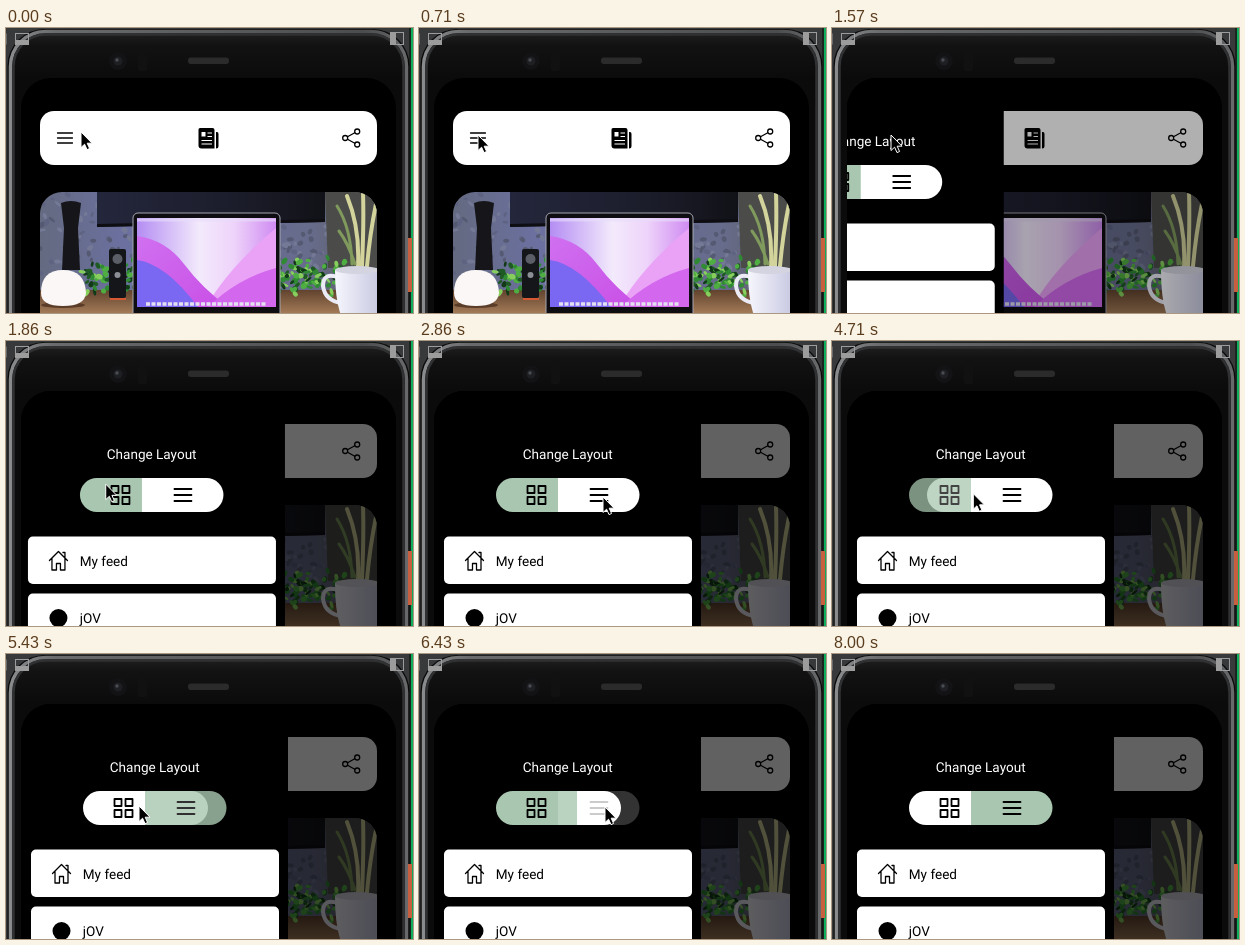
An HTML page that plays this animation: 407x285 px, repeating every 8.57 s.

```html
<!DOCTYPE html>
<html lang="en">
<head>
<meta charset="utf-8">
<title>Layout toggle</title>
<style>
html, body { margin: 0; width: 100%; height: 100%; overflow: hidden; background: #38393a; }
svg { display: block; width: 100%; height: 100%; }
text { font-family: Roboto, sans-serif; font-size: 13.55px; text-rendering: geometricPrecision; }
.line { fill: none; stroke: #000; stroke-width: 1.3; stroke-linecap: round; stroke-linejoin: round; }
.bold { stroke-width: 1.8; }
</style>
</head>
<body>
<svg viewBox="0 0 407 285" preserveAspectRatio="none">
  <defs>
    <linearGradient id="body" x1="0" y1="0" x2="0" y2="50" gradientUnits="userSpaceOnUse">
      <stop offset="0" stop-color="#242425"/><stop offset=".35" stop-color="#121213"/><stop offset="1" stop-color="#0b0b0c"/>
    </linearGradient>
    <linearGradient id="rim" x1="0" y1="0" x2="407" y2="0" gradientUnits="userSpaceOnUse">
      <stop offset="0" stop-color="#8d8e8f"/><stop offset=".12" stop-color="#6a6b6c"/>
      <stop offset=".88" stop-color="#4c4d4e"/><stop offset="1" stop-color="#6c6d6e"/>
    </linearGradient>
    <linearGradient id="wall" x1="0" y1="0" x2="1" y2="0">
      <stop offset="0" stop-color="#646a80"/><stop offset=".25" stop-color="#6b70a0"/>
      <stop offset=".8" stop-color="#676c8c"/><stop offset="1" stop-color="#5c5a58"/>
    </linearGradient>
    <linearGradient id="monitor" x1="0" y1="0" x2="1" y2="0">
      <stop offset="0" stop-color="#24263c"/><stop offset=".6" stop-color="#1c1d2b"/><stop offset="1" stop-color="#111217"/>
    </linearGradient>
    <linearGradient id="desk" x1="0" y1="0" x2="0" y2="1">
      <stop offset="0" stop-color="#61432e"/><stop offset="1" stop-color="#a27a57"/>
    </linearGradient>
    <linearGradient id="display" x1="0" y1="0" x2="1" y2="0">
      <stop offset="0" stop-color="#b48df3"/><stop offset=".45" stop-color="#f3eafc"/>
      <stop offset=".7" stop-color="#eed3fa"/><stop offset="1" stop-color="#cf8bf2"/>
    </linearGradient>
    <linearGradient id="ridge" x1="0" y1="0" x2="1" y2="1">
      <stop offset="0" stop-color="#d070f0"/><stop offset="1" stop-color="#c94fe6"/>
    </linearGradient>
    <linearGradient id="mug" x1="0" y1="0" x2="1" y2="0">
      <stop offset="0" stop-color="#f6f6fd"/><stop offset="1" stop-color="#c9cae2"/>
    </linearGradient>
    <clipPath id="screen"><rect x="15" y="50" width="375" height="290" rx="30"/></clipPath>
    <clipPath id="card"><rect x="34" y="164" width="337" height="160" rx="22"/></clipPath>
    <clipPath id="lid"><rect x="131" y="190" width="139" height="89"/></clipPath>
  </defs>

  <!-- window behind the phone -->
  <rect width="407" height="285" fill="#38393a"/>
  <rect x="403" width="4" height="285" fill="#1c2420"/>
  <rect x="405" width="2" height="285" fill="#0fae5c"/>

  <!-- phone -->
  <rect x="1.500" y="1" width="402" height="340" rx="37" fill="#0a0a0a"/>
  <rect x="4.500" y="3.500" width="396" height="340" rx="35" fill="url(#body)" stroke="url(#rim)" stroke-width="3.500"/>
  <rect x="7.500" y="6.500" width="390" height="340" rx="32" fill="none" stroke="#303132" stroke-width="2.500"/>
  <rect x="402" y="210" width="4" height="54" fill="#c8603f"/>
  <g fill="none" stroke="#9c9c9c">
    <path d="M0 5.500V16.500"/>
    <rect x="9.500" y="5.500" width="13" height="11"/>
    <rect x="384.500" y="4.500" width="13" height="12"/>
  </g>
  <path d="M10 12H22V16H10ZM385 5H390V16H385Z" fill="#9c9c9c"/>
  <circle cx="112" cy="33" r="9" fill="#131315"/>
  <circle cx="112" cy="33" r="4.500" fill="#1e1f23"/>
  <circle cx="111" cy="32" r="1.700" fill="#4a4c53"/>
  <rect x="132" y="24" width="9" height="19" rx="2" fill="#111112"/>
  <rect x="182" y="29.500" width="41" height="6.500" rx="3" fill="#2b2b2c"/>
  <rect x="15" y="50" width="375" height="290" rx="30"/>

  <g clip-path="url(#screen)">
    <!-- header -->
    <rect x="34" y="83" width="337" height="54" rx="14" fill="#fff"/>
    <path class="line" d="M51.500 105H66.500M51.500 110H66.500M51.500 115H66.500"/>
    <path d="M194 100H206.500Q208.500 100 208.500 102V120.500H195.500Q192.500 120.500 192.500 117.500V101.500Q192.500 100 194 100ZM210 104H211Q212.500 104 212.500 106V118Q212.500 120.500 210 120.500Z"/>
    <path d="M201.500 105H206M201.500 108.500H206M195.500 112.500H206M195.500 116H206" stroke="#fff" stroke-width="1.200"/>
    <rect x="195.500" y="104" width="4" height="4.500" fill="#fff"/>
    <g class="line">
      <path d="M341.500 108.800L348.800 104.800M341.500 111.200L348.800 115.200"/>
      <circle cx="339.200" cy="110" r="2.500"/><circle cx="351.200" cy="103.500" r="2.500"/><circle cx="351.200" cy="116.500" r="2.500"/>
    </g>

    <!-- picture card -->
    <g clip-path="url(#card)">
      <rect x="34" y="164" width="337" height="121" fill="url(#wall)"/>
      <g id="texture"></g>
      <path d="M91 164H319V194L91 199Z" fill="url(#monitor)"/>
      <path d="M91 196L319 191V194L91 199Z" fill="#0d0d12"/>
      <rect x="34" y="262" width="337" height="23" fill="url(#desk)"/>
      <path d="M319 164H371V240H322Z" fill="#4b4c49"/>
      <g id="leaves"></g>
      <g fill="none" stroke="#d3d39c" stroke-width="4" stroke-linecap="round">
        <path d="M352 238Q354 200 341 168M356 238Q358 195 357 164M361 238Q364 205 370 176"/>
        <path d="M349 236Q342 215 333 203M346 236Q345 200 331 178" stroke="#7f9a5c" stroke-width="3"/>
      </g>
      <path d="M55 175Q65 171 75 175L72 200L74 242H56L58 200Z" fill="#15151a"/>
      <rect x="103" y="221" width="17" height="49" rx="2" fill="#15161a"/>
      <circle cx="111.500" cy="231" r="5" fill="#5b5e66"/><circle cx="111.500" cy="247" r="3" fill="#8c8f96"/>
      <path d="M104 271H120" stroke="#d55a34" stroke-width="2"/>
      <ellipse cx="57" cy="277" rx="22" ry="3" fill="#5a3c28"/>
      <path d="M35 265Q35 242 57 242T80 265Q79 278 57 278T35 265Z" fill="#fbf7f6"/>
      <rect x="127" y="185" width="147" height="105" rx="5" fill="#0d0d12" stroke="#a5a6b0"/>
      <g clip-path="url(#lid)">
        <rect x="131" y="190" width="139" height="89" fill="url(#display)"/>
        <path d="M200 279Q222 240 270 200V279Z" fill="#e9a2f6"/>
        <path d="M131 208Q160 212 178 236T222 279H131Z" fill="url(#ridge)"/>
        <path d="M131 232Q160 236 192 279H131Z" fill="#7a68f2"/>
        <path d="M202 279Q232 250 270 240V279Z" fill="#d368ee"/>
        <path d="M131 192H270" stroke="#e8defa" stroke-width="3" opacity=".6"/>
        <path d="M140 276H261" stroke="#e3dff1" stroke-width="3.500" stroke-dasharray="4 1.500"/>
      </g>
      <path d="M334 250Q317 243 317 258Q319 273 336 275" fill="none" stroke="#ebebf6" stroke-width="4"/>
      <path d="M329 242H372V290H336Q329 274 329 242Z" fill="url(#mug)"/>
      <ellipse cx="351" cy="242" rx="22" ry="4" fill="#d3d4e0"/>
    </g>
    <rect id="shade" x="15" y="50" width="375" height="235" opacity="0"/>

    <!-- drawer -->
    <g id="drawer">
      <rect x="15" y="50" width="267" height="235"/>
      <text x="148.700" y="118" text-anchor="middle" fill="#fff">Change Layout</text>
      <rect x="95" y="137" width="107" height="34" rx="17" fill="#fff"/>
      <g id="gridTab">
        <path d="M158 137H94A17 17 0 0 0 94 171H158Z"/>
        <path class="line bold" d="M108.500 145H115.500V152H108.500ZM119.500 145H126.500V152H119.500ZM108.500 156H115.500V163H108.500ZM119.500 156H126.500V163H119.500Z"/>
      </g>
      <g id="listTab">
        <path d="M139 137H203.500A17 17 0 0 1 203.500 171H139Z"/>
        <path class="line bold" d="M171.500 148H188.500M171.500 154H188.500M171.500 160H188.500"/>
      </g>
      <rect x="25" y="195.500" width="248" height="47.500" rx="5" fill="#fff"/>
      <rect x="25" y="252.500" width="248" height="47.500" rx="5" fill="#fff"/>
      <path class="line" d="M46.500 219.500L55.500 210.500L64.500 219.500M49 217.500V229H53.500V222.500H57.500V229H62V217.500M62 216.500V211.500H60"/>
      <circle cx="55.500" cy="277" r="9"/>
      <text x="76.800" y="225">My feed</text>
      <text x="76.800" y="282">jOV</text>
    </g>
  </g>

  <path id="cursor" d="M0 0V15.500L3.600 12.200L6 17.600L8.600 16.500L6.200 11.200H11Z" stroke="#fff" stroke-width="1"/>
</svg>
<script>
const LOOP = 8570, STEP = 1000 / 7, GREEN = '#a9c7b0';
const $ = id => document.getElementById(id);
const clamp = u => Math.max(0, Math.min(1, u));
const mix = (a, b, u) => a + (b - a) * u;
const easeOut = u => 1 - (1 - u) ** 3;
const easeInOut = u => u < .5 ? 2 * u * u : 1 - 2 * (1 - u) ** 2;

// tab, press time, release time
const taps = [
  ['list', 2900, 3010], ['grid', 3400, 3500], ['list', 3830, 4060],
  ['grid', 4480, 4580], ['list', 5110, 5265], ['grid', 5500, 5600],
  ['list', 6260, 6460], ['grid', 6760, 6850], ['list', 7080, 7160]
];

// time, x, y of the pointer
const route = [
  [0, 75, 104], [700, 59, 107], [1580, 59, 107], [2000, 112, 154],
  [2143, 204, 157], [2300, 204, 157], [2850, 184, 156], [3010, 184, 156],
  [3300, 133, 153], [3500, 133, 153], [3780, 180, 156], [4080, 180, 156],
  [4430, 133, 152], [4600, 133, 152], [5000, 184, 156], [5260, 184, 156],
  [5425, 133, 152], [5620, 133, 152], [6100, 183, 154], [6400, 186, 153],
  [6500, 186, 153], [6740, 134, 152], [6860, 134, 152], [7050, 185, 154],
  [7160, 185, 154], [7280, 89, 148]
];

function pointerAt(t) {
  const i = route.findIndex(p => p[0] > t);
  if (i < 0) return route[route.length - 1].slice(1);
  const [a, b] = [route[i - 1], route[i]];
  const u = easeInOut((t - a[0]) / (b[0] - a[0]));
  return [mix(a[1], b[1], u), mix(a[2], b[2], u)];
}

function tabOpacity(tab, t) {
  const tap = taps.filter(p => p[0] === tab && p[1] <= t).pop();
  if (!tap) return 1;
  const [, down, up] = tap;
  const pressed = mix(1, .2, easeInOut(clamp((Math.min(t, up) - down) / 150)));
  return t < up ? pressed : mix(pressed, 1, easeInOut(clamp((t - up) / 250)));
}

function paintTab(tab, chosen, t) {
  const el = $(tab + 'Tab');
  el.setAttribute('opacity', tabOpacity(tab, t));
  el.firstElementChild.setAttribute('fill', tab === chosen ? GREEN : '#fff');
}

let seed = 7;
const rnd = () => (seed = seed * 16807 % 2147483647) / 2147483647;

// Fills a group with small tilted ovals, densest at mid height.
function scatter(id, count, [x, y, w, h], size, tones) {
  let out = '';
  for (let i = 0; i < count; i++) {
    const cx = x + rnd() * w, cy = y + (rnd() + rnd()) * h / 2;
    out += `<ellipse cx="${cx}" cy="${cy}" rx="${size * (1 + rnd())}" ry="${size * (.6 + rnd() * .8)}"
      fill="${tones[i % tones.length]}" transform="rotate(${rnd() * 180} ${cx} ${cy})"/>`;
  }
  $(id).innerHTML = out;
}

function render(t) {
  const open = easeOut(clamp((t - 1431) / 550));
  $('drawer').setAttribute('transform', `translate(${-267 * (1 - open)} 0)`);
  $('drawer').setAttribute('visibility', open ? 'visible' : 'hidden');
  $('shade').setAttribute('opacity', .62 * open ** 1.3);

  const last = taps.filter(p => p[2] <= t).pop();
  const chosen = last ? last[0] : 'grid';
  paintTab('grid', chosen, t);
  paintTab('list', chosen, t);

  $('cursor').setAttribute('transform', `translate(${pointerAt(t)})`);
  $('cursor').setAttribute('visibility', t < 7990 ? 'visible' : 'hidden');
}

function tick() {
  const t = performance.now() % LOOP;
  render(Math.floor((t + 4) / STEP) * STEP);
  requestAnimationFrame(tick);
}

scatter('texture', 200, [34, 160, 337, 100], 2, ['#555a72', '#747a96', '#5e6382']);
scatter('leaves', 340, [76, 229, 264, 40], 2, ['#1f5a25', '#2f8a33', '#4fae41', '#123a18', '#86cf5c']);
tick();
</script>
</body>
</html>
```
